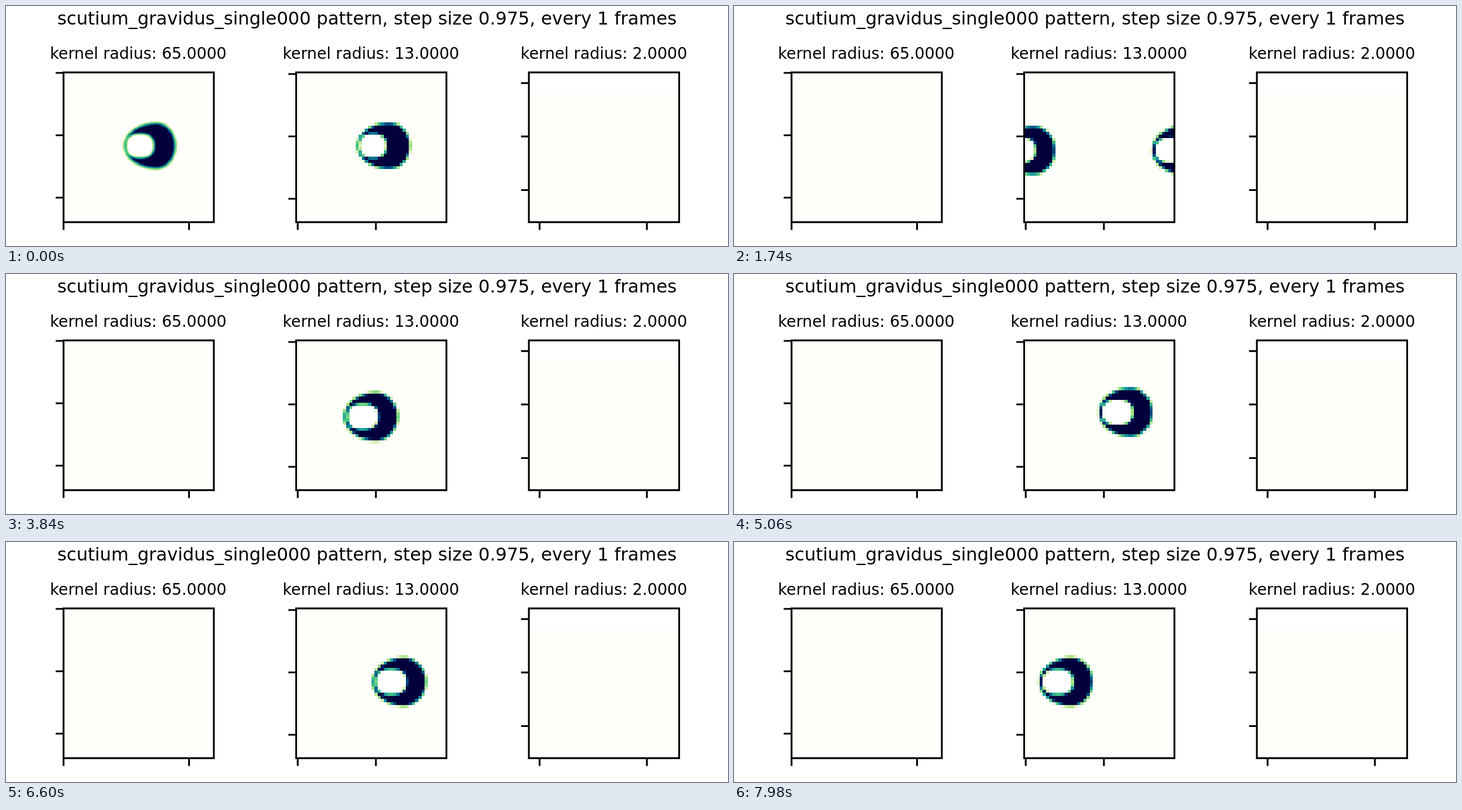
These frames come from a looping animation (1280x427 px, 8000 ms). An HTML page with a canvas:

```html
<!DOCTYPE html>
<html lang="en">
<head>
<meta charset="utf-8">
<title>Glider at three kernel radii</title>
<style>
  html, body { margin: 0; width: 100%; height: 100%; overflow: hidden; background: #fff; }
  canvas { position: absolute; top: 118.2px; width: 266.4px; height: 266.4px; image-rendering: pixelated; background: #fefffa; }
  #fine { left: 102px; }
  #coarse { left: 514.4px; }
  svg { position: absolute; left: 0; top: 0; }
  text { font-family: "DejaVu Sans", sans-serif; font-size: 27.76px; text-anchor: middle; }
  .title { font-size: 31.73px; }
  path { fill: none; stroke: #000; stroke-width: 3.17; }
</style>
</head>
<body>
<canvas id="fine" width="240" height="240"></canvas>
<canvas id="coarse" width="48" height="48"></canvas>
<svg width="1280" height="427" viewBox="0 0 1280 427">
  <path fill="none" d="M102 118.2h266.4v266.4h-266.4zM102 119h-13.9M102 230h-13.9M102 341h-13.9M102 384.6v13.9M324.5 384.6v13.9"/>
  <path d="M514.4 118.2h266.4v266.4h-266.4zM514.4 121h-13.9M514.4 232h-13.9M514.4 343h-13.9M517.2 384.6v13.9M655.8 384.6v13.9"/>
  <rect x="927" y="156.3" width="266.4" height="228.3" fill="#fefffa"/>
  <path d="M927 118.2h266.4v266.4h-266.4zM927 137.2h-13.9M927 232.2h-13.9M927 327.5h-13.9M946 384.6v13.9M1136.2 384.6v13.9"/>
  <text class="title" x="640" y="33">scutium_gravidus_single000 pattern, step size 0.975, every 1 frames</text>
  <text x="234.5" y="94">kernel radius: 65.0000</text>
  <text x="647" y="94">kernel radius: 13.0000</text>
  <text x="1060" y="94">kernel radius: 2.0000</text>
</svg>
<script>
const STEP = 20, LOOP = 8000, SIZE = 48, FINE_LIFE = 22;

const clamp = v => Math.max(0, Math.min(1, v));
const mix = (a, b, k) => a + (b - a) * k;
const wrap = (v, m) => ((v % m) + m) % m;

// value, red, green, blue
const RAMP = [
  [0, 254, 255, 250], [.15, 225, 244, 196], [.3, 165, 226, 130], [.48, 75, 198, 135],
  [.65, 20, 148, 155], [.82, 0, 78, 132], [1, 3, 0, 60]
];
// time in ms, row
const ROWS = [[0, 23.5], [600, 24.5], [1740, 24.9], [2940, 24.5], [3840, 24.4], [5060, 23], [6600, 23.5], [8000, 23.5]];

function along(stops, t) {
  let i = 1;
  while (i < stops.length - 1 && t > stops[i][0]) i++;
  const a = stops[i - 1], b = stops[i];
  const k = clamp((t - a[0]) / (b[0] - a[0]));
  return a.slice(1).map((v, j) => mix(v, b[j + 1], k));
}
const palette = Array.from({ length: 256 }, (_, i) => along(RAMP, i / 255));

// Radial distance to a superellipse, negative inside
function distance(x, y, a, b, p) {
  const f = Math.pow(Math.pow(Math.abs(x / a), p) + Math.pow(Math.abs(y / b), p), 1 / p);
  return f < 1e-6 ? -Math.min(a, b) : Math.hypot(x, y) * (1 - 1 / f);
}

function glider(n) {
  const k = 1 - Math.exp(-n / 12);
  return {
    x: 25.5 + 2.5 * n + 4.3 * (1 - k), y: along(ROWS, n * STEP)[0],
    left: mix(10.3, 10.1, k), right: mix(6.5, 6.9, k), height: mix(7.4, 7.75, k),
    hole: mix(-5.3, -4.2, k), holeW: mix(4.3, 4.9, k), holeH: mix(3.8, 4, k),
    soft: 1.15, level: 1
  };
}

// The fine grid swells, thins and goes out
function fineGlider(n) {
  const k = n / FINE_LIFE;
  return Object.assign(glider(n), {
    y: 23.5, height: mix(7.3, 9.5, k), right: mix(6, 7.5, k),
    holeW: mix(4.4, 6.6, k), holeH: mix(3.8, 7.2, k), hole: mix(-5.3, -4, k),
    soft: 1.5, level: clamp((FINE_LIFE - n) / 6)
  });
}

function painter(id) {
  const canvas = document.getElementById(id), ctx = canvas.getContext("2d");
  const count = canvas.width, image = ctx.createImageData(count, count), cell = SIZE / count;
  return g => {
    for (let j = 0, at = 0; j < count; j++) {
      const y = (j + .5) * cell - g.y;
      for (let i = 0; i < count; i++, at += 4) {
        const x = wrap((i + .5) * cell - g.x + 26, SIZE) - 26;
        let color = palette[0];
        if (g.level && Math.abs(y) < 12 && Math.abs(x) < 13) {
          const outer = distance(x, y, x < 0 ? g.left : g.right, g.height, 2);
          const inner = distance(x - g.hole, y, g.holeW, g.holeH, 2.5);
          const v = clamp(.5 - outer / g.soft) * clamp(.5 + inner / (g.soft * .8)) * g.level;
          color = v === 0 && inner < 0 ? [255, 255, 255] : palette[Math.round(v * 255)];
        }
        image.data[at] = color[0];
        image.data[at + 1] = color[1];
        image.data[at + 2] = color[2];
        image.data[at + 3] = 255;
      }
    }
    ctx.putImageData(image, 0, 0);
  };
}

const paintFine = painter("fine"), paintCoarse = painter("coarse");
let last = -1;

function draw(now) {
  const n = Math.floor((now % LOOP) / STEP);
  if (n !== last) {
    const fine = Math.min(n, FINE_LIFE);
    if (n < FINE_LIFE || last < FINE_LIFE || n < last) paintFine(fineGlider(fine));
    paintCoarse(glider(n));
    last = n;
  }
  requestAnimationFrame(() => draw(performance.now()));
}
draw(0);
</script>
</body>
</html>
```
